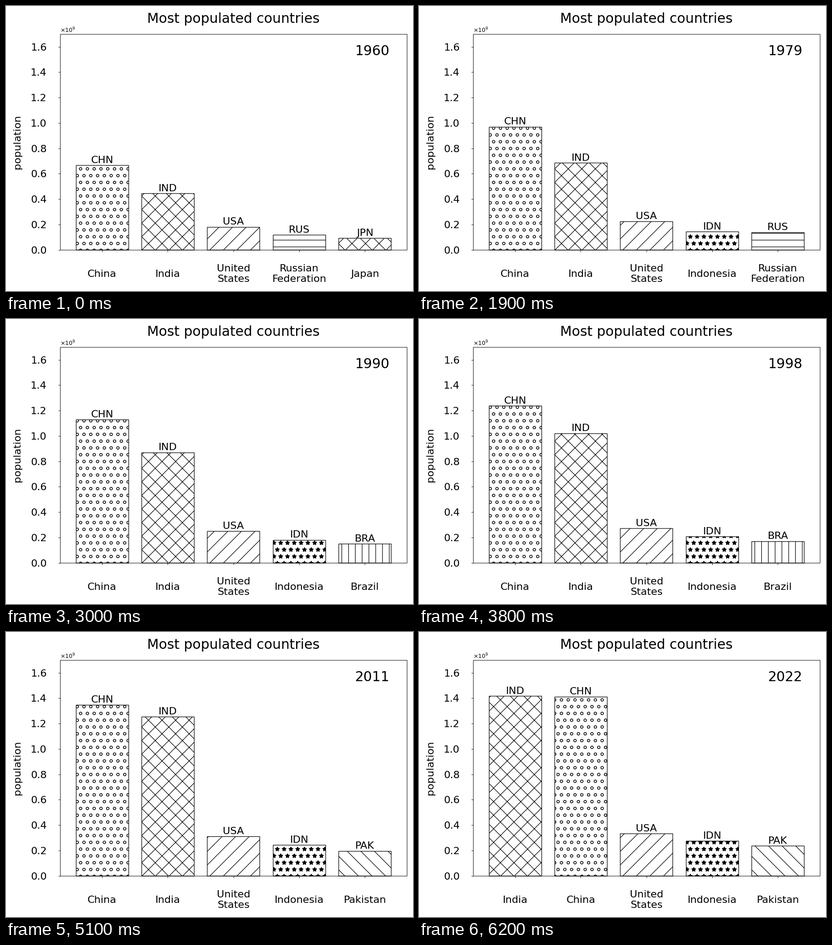
Write a matplotlib script that moves like this. It is 894 px wide and 626 px high and loops after 6300 ms.

```python
import numpy as np
import matplotlib.pyplot as plt
from matplotlib.animation import FuncAnimation
from matplotlib.patches import PathPatch, Rectangle
from matplotlib.path import Path
from matplotlib.transforms import Affine2D

W, H, DPI = 894, 626, 64
GRID_W, GRID_H = 1000, 700       # layout grid, 100 units per inch
LEFT, RIGHT, TOP, BASE = 132.8, 985, 68.9, 599
YMAX = 1700                      # millions
START, END = 1960, 2022
GAP = 100 / 6                    # spacing of the hatch pattern
SLOTS = 5
STEP = (RIGHT - LEFT) / (SLOTS + 0.28)
BAR = 0.8 * STEP

# code: (name, hatch, turning points of steady growth in millions)
COUNTRIES = {
    "CHN": ("China", "o", {1960: 667, 1962: 664, 1975: 916, 1985: 1051, 1993: 1178,
                           2000: 1263, 2008: 1325, 2018: 1403, 2022: 1412}),
    "IND": ("India", "x", {1960: 446, 1970: 557, 1982: 729, 1990: 870,
                           2006: 1172, 2016: 1338, 2022: 1417}),
    "USA": ("United\nStates", "/", {1960: 181, 1990: 250, 2010: 309, 2022: 333}),
    "RUS": ("Russian\nFederation", "-", {1960: 119.9, 1989: 147.7}),
    "JPN": ("Japan", "x", {1960: 93.2, 1965: 98}),
    "IDN": ("Indonesia", "*", {1960: 87.8, 1970: 115, 1980: 148, 2000: 214, 2022: 275.5}),
    "BRA": ("Brazil", "|", {1960: 73, 1989: 148, 2000: 176, 2022: 215.5}),
    "PAK": ("Pakistan", "\\", {1960: 46, 2010: 193.5, 2022: 235.8}),
}


def pt(size):
    """Convert layout points to figure points."""
    return size * W / GRID_W * 100 / DPI


def snap(v):
    """Move a coordinate to the middle of a layout cell."""
    return np.floor(v + 0.5) + 0.5


def population(code, year):
    points = COUNTRIES[code][2]
    return np.interp(year, list(points), list(points.values()))


def multiples(lo, hi, step, offset=0.0):
    """All values offset + k * step that cover lo..hi."""
    first = np.floor((lo - offset) / step)
    last = np.ceil((hi - offset) / step)
    return offset + step * np.arange(first, last + 1)


def line_hatch(kind, x0, x1):
    lines = []
    if kind == "-":
        lines += [[(x0, y), (x1, y)] for y in multiples(TOP, BASE, GAP, GAP / 2)]
    if kind == "|":
        lines += [[(x, TOP), (x, BASE)] for x in multiples(x0, x1, GAP, GAP / 2)]
    if kind in "/x":
        lines += [[(c - TOP, TOP), (c - BASE, BASE)]
                  for c in multiples(x0 + TOP, x1 + BASE, 2 * GAP)]
    if kind in "\\x":
        lines += [[(c + TOP, TOP), (c + BASE, BASE)]
                  for c in multiples(x0 - BASE, x1 - TOP, 2 * GAP)]
    return [Path(line) for line in lines]


def shape_hatch(kind, x0, x1, top):
    if kind == "o":
        shape, size = Path.unit_circle(), 0.19 * GAP
    else:
        shape, size = Path.unit_regular_star(5), GAP / 3
    shapes = []
    for y in multiples(top, BASE, GAP):
        shift = round(y / GAP) % 2 * GAP / 2
        for x in multiples(x0, x1, GAP, shift):
            place = Affine2D().scale(size, -size).translate(x, y)
            shapes.append(shape.transformed(place))
    return shapes


fig = plt.figure(figsize=(W / DPI, H / DPI), dpi=DPI, facecolor="white")

# Canvas in layout units for bars, frame and text, y pointing down
stage = fig.add_axes([0, 0, 1, 1], zorder=1)
stage.set(xlim=(0, GRID_W), ylim=(GRID_H, 0))
stage.axis("off")


def box(x0, y0, x1, y1, **kw):
    return stage.add_patch(Rectangle((x0, y0), x1 - x0, y1 - y0, snap=False, **kw))


def label(x, y, text, size, ha="center", va="center", **kw):
    return stage.text(x, y, text, fontsize=pt(size), ha=ha, va=va,
                      family="DejaVu Sans", **kw)


# Axes that only carry the ticks
ax = fig.add_axes([LEFT / GRID_W, 1 - BASE / GRID_H,
                   (RIGHT - LEFT) / GRID_W, (BASE - TOP) / GRID_H], zorder=2)
ax.patch.set_visible(False)
ax.spines[:].set_visible(False)
centers = LEFT + STEP * (0.64 + np.arange(SLOTS))
ax.set(xlim=(LEFT, RIGHT), ylim=(0, YMAX), xticks=centers, xticklabels=[])
ticks = np.arange(0, YMAX, 200)
ax.set_yticks(ticks, [f"{t / 1000:.1f}" for t in ticks])
ax.tick_params(length=pt(3.5), width=pt(0.8), pad=pt(20), labelsize=pt(18))

box(snap(LEFT), snap(TOP), snap(RIGHT), snap(BASE), fc="none", ec="black",
    lw=pt(0.8), zorder=5)
label((LEFT + RIGHT) / 2, TOP - 27.8, "Most populated countries", 24, va="baseline")
label(27.5, (TOP + BASE) / 2, "population", 18, rotation=90)
label(LEFT, TOP - 4.2, r"$\times\mathdefault{10^{9}}$", 10, ha="left", va="baseline")
year_text = label(LEFT + 0.95 * (RIGHT - LEFT), BASE - 0.95 * (BASE - TOP), "",
                  24, ha="right", va="top")


class Slot:
    """One place in the ranking: a hatched bar with its two labels."""

    def __init__(self, cx):
        self.x0, self.x1 = snap(cx - BAR / 2), snap(cx + BAR / 2)
        self.hatch = stage.add_patch(PathPatch(Path([(0, 0), (0, 0)]), ec="black",
                                               snap=False, zorder=2))
        self.bar = box(self.x0, BASE, self.x1, BASE, fc="none", ec="black",
                       lw=pt(1), zorder=3)
        self.code = label(cx, BASE, "", 18, va="bottom", zorder=4)
        self.name = label(cx, 658.2, "", 18)

    def show(self, code, year):
        name, kind, _ = COUNTRIES[code]
        y = BASE - (BASE - TOP) * population(code, year) / YMAX
        top, bottom = snap(y), snap(BASE)
        self.bar.set_bounds(self.x0, top, self.x1 - self.x0, bottom - top)
        if kind in "o*":
            parts = shape_hatch(kind, self.x0, self.x1, top)
        else:
            parts = line_hatch(kind, self.x0, self.x1)
        self.hatch.set_path(Path.make_compound_path(*parts))
        self.hatch.set_facecolor("black" if kind == "*" else "none")
        self.hatch.set_linewidth(pt(1.24 if kind == "o" else 1))
        self.hatch.set_clip_path(self.bar)
        self.code.set_text(code)
        self.code.set_y(y - 0.8)
        self.name.set_text(name)


slots = [Slot(cx) for cx in centers]


def update(frame):
    year = START + frame
    year_text.set_text(str(year))
    ranked = sorted(COUNTRIES, key=lambda code: -population(code, year))
    for slot, code in zip(slots, ranked):
        slot.show(code, year)
    return []


anim = FuncAnimation(fig, update, frames=END - START + 1, interval=100,
                     repeat=True, repeat_delay=0, blit=False)
plt.show()
```
